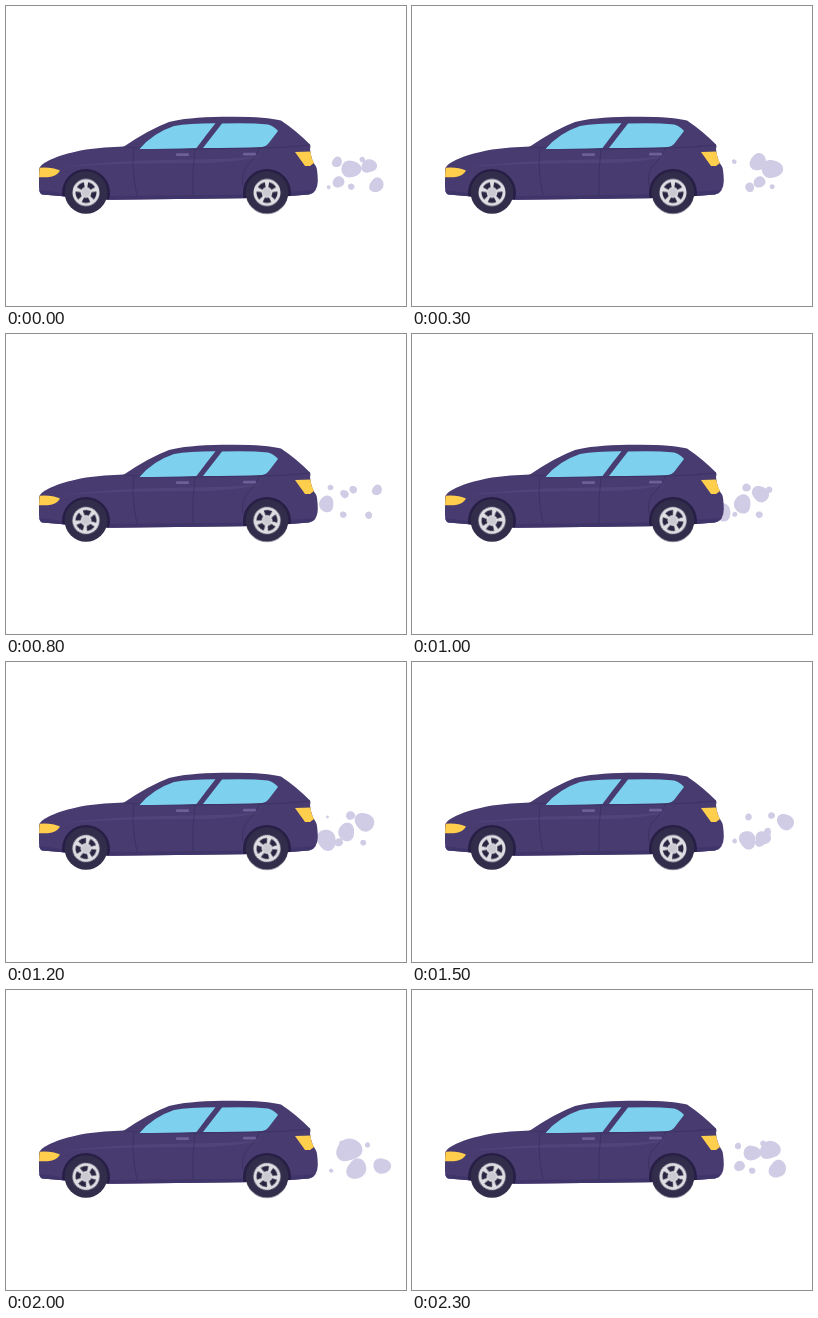
An HTML page for the animation above (2.4 s loop, 400 px wide and 300 px high).

```html
<!DOCTYPE html>
<html lang="en">
<head>
<meta charset="utf-8">
<title>Car with exhaust smoke</title>
<style>
html, body { margin: 0; width: 100%; height: 100%; overflow: hidden; background: #fff; }
svg { display: block; width: 400px; height: 300px; }
.line { fill: none; stroke: #3a305f; stroke-width: 0.8; }
.wheel { animation: spin 1200ms steps(12) infinite; }
@keyframes spin { to { transform: rotate(-360deg); } }
</style>
</head>
<body>
<svg viewBox="0 0 400 300">
  <defs>
    <path id="slot" d="M-4.300 -9.600Q0 -11.400 4.300 -9.600L2 -5Q0 -5.800 -2 -5Z" fill="#2a2540"/>
    <g id="rim">
      <circle r="13.500" fill="#dedde2"/>
      <use href="#slot" transform="rotate(36)"/>
      <use href="#slot" transform="rotate(108)"/>
      <use href="#slot" transform="rotate(180)"/>
      <use href="#slot" transform="rotate(252)"/>
      <use href="#slot" transform="rotate(324)"/>
      <circle r="4.400" fill="#cbcad2"/>
    </g>
    <g id="tyre">
      <circle r="21.300" fill="#322d4b"/>
      <use class="wheel" href="#rim"/>
    </g>
    <path id="body" d="M33 163Q35 158 41 155.500Q53 148.500 80 143.500Q98 141 118 140.500Q143 123.500 163 116Q180 111.500 216 110.800Q258 110 275 114.500Q290 124.500 304 138.500Q305 140 304 143Q305 154 310 160.500Q311.500 163 311.800 175Q311.500 187 303 188.500L284 190L236 192.300L105 193.700L60 190.500L36 188.500Q33 187 33 181Z"/>
    <clipPath id="shell"><use href="#body"/></clipPath>
  </defs>
  <path id="smoke" fill="#d1cce6"/>
  <use href="#body" fill="#473b70"/>
  <g clip-path="url(#shell)">
    <path d="M56 161Q110 154 187 153.500Q230 153 256 150Q230 157 187 157Q110 157 56 161Z" fill="#50447a"/>
    <path d="M33 184L60 187.500L105 190L236 188.500L312 184V195H33Z" fill="#40356a"/>
    <circle cx="80" cy="187" r="24" fill="#271f45"/>
    <circle cx="261" cy="187" r="24" fill="#271f45"/>
  </g>
  <path d="M117 141Q145 143.500 190 143L252 142Q280 142 304 139" class="line"/>
  <path d="M128 143Q125 160 131 190M189 143Q186 166 187 190M254 142Q249 152 240 161Q235 168 237 180" class="line"/>
  <path d="M133.500 143Q147 127 168 120Q183 117.200 209.500 117.200Q200 129 190.500 142Q160 143 133.500 143Z" fill="#7dd1ef"/>
  <path d="M197 142L216 117.500Q244 116.500 262 118.500Q268 120 272 125L262 138Q260 140.500 256 141Q230 142 197 142Z" fill="#7dd1ef"/>
  <g fill="#6b6097">
    <rect x="170" y="147.300" width="13" height="2.800" rx="1"/>
    <rect x="237" y="146.800" width="13" height="2.800" rx="1"/>
  </g>
  <path d="M33.500 161.700Q46 160.700 54 164.500Q51 170.500 42 171.300H33Z" fill="#ffce4d"/>
  <path d="M289 146L304.300 145.500Q305 152 308 157L304 160H299Q294 153 289 146Z" fill="#ffce4d"/>
  <use href="#tyre" x="80" y="186.500"/>
  <use href="#tyre" x="261" y="186.500"/>
</svg>
<script>
const LOOP = 2400, STEP = 100, SPEED = 0.05, HALF_LIFE = 500;
const random = n => { const v = Math.sin(n * 12.9898) * 43758.5453; return v - Math.floor(v); };

// Large puffs: the moment of full size, and the place and radius then.
const puffs = [
  [200, 355, 163, 10], [150, 340, 176, 6], [400, 351, 156, 8.5],
  [1050, 333, 170, 9], [1250, 323, 178, 10], [1250, 361, 160, 9.5],
  [1800, 366, 176, 9], [2000, 343, 160, 12], [2050, 353, 179, 10]
].map(([peak, x, y, r]) => ({ peak, x, y, r }));

// Small puffs leave at a steady beat, by turns above and below the cloud.
for (let i = 0; i < 10; i++) {
  puffs.push({
    peak: 220 + i * LOOP / 10,
    x: 342 + 4 * random(i),
    y: (i % 2 ? 179 : 153) + 4 * random(i + 20),
    r: 3 + 2 * random(i + 40)
  });
}

// Each puff drifts right at one speed, swells and shrinks again.
function blob({ peak, x, y, r }, seed, t) {
  const dt = (t - peak + 1.5 * LOOP) % LOOP - LOOP / 2;
  const age = dt / HALF_LIFE;
  if (Math.abs(age) >= 1) return "";
  const size = r * Math.sqrt(1 - age * age), cx = x + SPEED * dt;
  const wobble = 0.009 * r, points = [];
  for (let q = 0; q < 2 * Math.PI; q += Math.PI / 18) {
    const rad = size * (1 + wobble * Math.cos(2 * q + seed) + wobble / 2 * Math.cos(3 * q - seed));
    points.push((cx + rad * Math.cos(q)).toFixed(2) + " " + (y + rad * Math.sin(q)).toFixed(2));
  }
  return "M" + points.join("L") + "Z";
}

const smoke = document.getElementById("smoke");
const start = performance.now();

function draw() {
  const now = Math.max(0, performance.now() - start) % LOOP;
  const t = Math.floor(now / STEP) * STEP;
  smoke.setAttribute("d", puffs.map((p, i) => blob(p, i, t)).join(""));
  requestAnimationFrame(draw);
}
draw();
</script>
</body>
</html>
```
